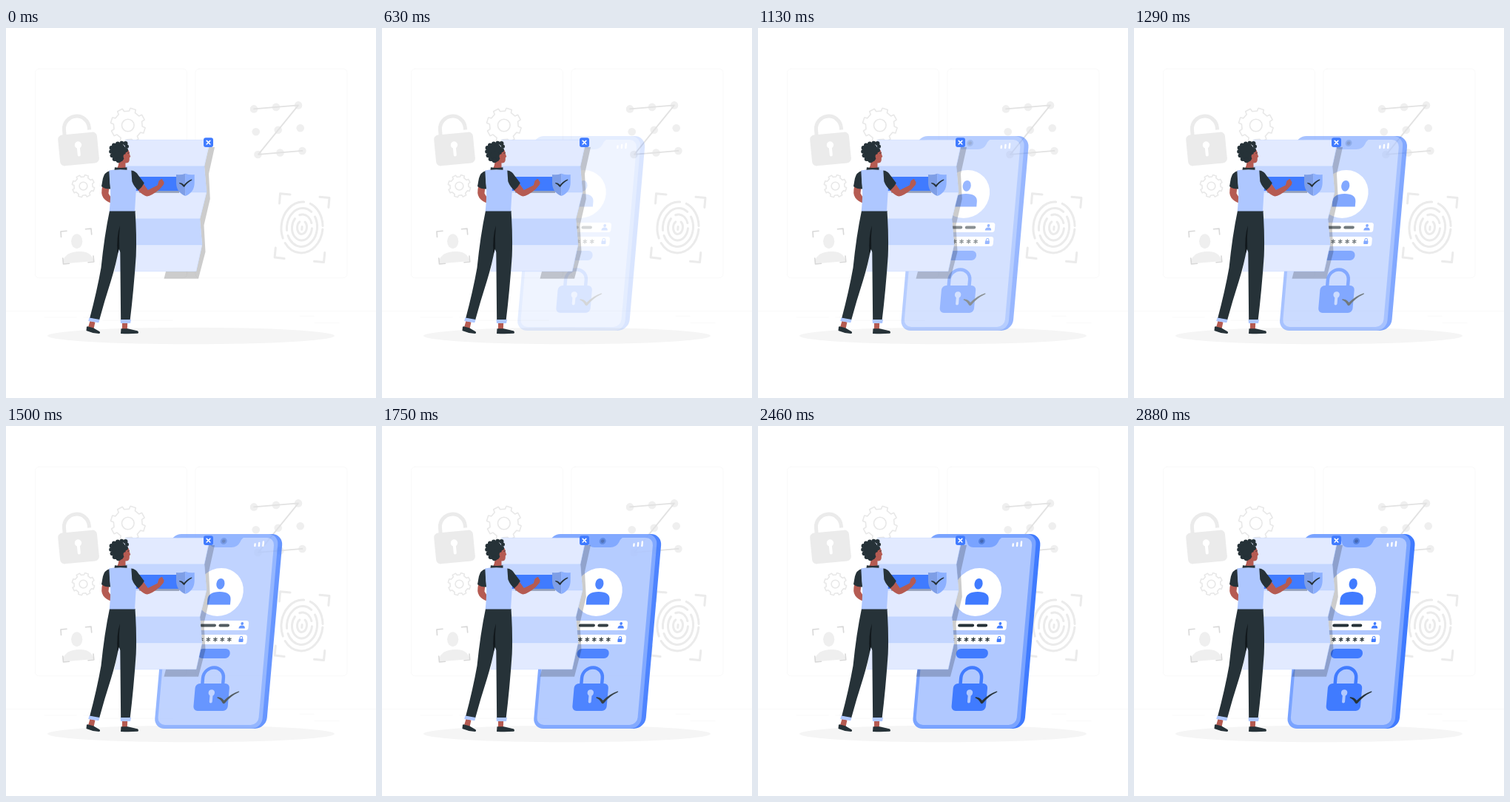
These frames come from a looping animation (500x500 px, 2.93 s). An HTML page:

```html
<!DOCTYPE html>
<html lang="en">
<head>
<meta charset="utf-8">
<title>Secure sign-in</title>
<style>
  html, body { margin: 0; width: 100%; height: 100%; overflow: hidden; background: #fff; }
  svg { display: block; width: 100vw; height: 100vh; }
  .line { fill: none; stroke-linecap: round; stroke-linejoin: round; }
  .dark { fill: #263238; }
  .blue { fill: #407bff; }
  .skin { fill: #b55b52; }
  .pale { fill: #aec7ff; }
  .white { fill: #fff; }
</style>
</head>
<body>
<svg viewBox="0 0 500 500">
  <!-- Room -->
  <g class="line" stroke="#ebebeb" stroke-width=".3">
    <rect x="39.5" y="55.2" width="205" height="282.4" rx="5"/>
    <rect x="256" y="55.2" width="205" height="282.4" rx="5"/>
    <path d="M0 382.5H500M417 398.6h33M397 389.3h19M52 391h43M105 391h6M131 395.2h94"/>
  </g>
  <ellipse cx="250" cy="416" rx="194" ry="11.3" fill="#f5f5f5"/>

  <!-- Grey padlock, shackle open on the right -->
  <g transform="rotate(-5.5 98 163)">
    <path fill="none" stroke="#ebebeb" stroke-width="5" d="M81 145v-9a17 17 0 0 1 34 0v3"/>
    <rect x="71.5" y="142.5" width="53" height="42" rx="6" fill="#ebebeb"/>
    <circle class="white" cx="98" cy="158" r="4.7"/>
    <path class="line" stroke="#fff" stroke-width="4" d="M98 160v11.5"/>
  </g>

  <g id="gears" class="line" stroke="#e8e8e8" stroke-width="1.6"></g>

  <!-- Face scan -->
  <g fill="#efefef">
    <ellipse cx="95.7" cy="288.3" rx="7.6" ry="10"/>
    <path d="M77 318.5q0-14 18-16.2q20-2.3 23.5 12.7z"/>
  </g>
  <path class="line" stroke="#d8d8d8" stroke-width="1.6"
    d="M74.5 282.5L74 275l8-.7M107.5 271.7l7.5-.6l.7 7.9M118 308l.8 8l-7.8.7M76.8 311l.7 8l8-.7"/>

  <!-- Unlock pattern -->
  <g transform="translate(0 .4)">
    <g id="dots" fill="#efefef"></g>
    <path class="line" stroke="#e2e2e2" stroke-width="1.8" d="M335 109l60-5l-54 66.5l59.5-5"/>
  </g>

  <!-- Fingerprint -->
  <g class="line" stroke="#ebebeb" stroke-width="3">
    <path d="M369.5 237l1-13.2l13.5 1.2M424 228.3l13 1.2l-1.2 13M364.3 297l-1.2 13l13 1.5M416.5 315.3l13 1.2l1.3-13"/>
    <g id="print" transform="translate(400 269.5) rotate(5)"></g>
  </g>

  <!-- Phone -->
  <g id="phone">
    <g transform="translate(0 409) skewX(-5) translate(0 -409)">
      <rect class="blue" x="213" y="146" width="144.7" height="263" rx="15"/>
      <rect x="206.3" y="146" width="145.4" height="263" rx="14" fill="#79a3ff"/>
      <rect x="210.5" y="151" width="136" height="253" rx="10" fill="#b0c8ff"/>
      <path fill="#79a3ff" d="M251 150.5q6 1 7.5 6q2 7.5 9 7.5h22q8 0 11-7q2-6 6-6.5z"/>
      <circle cx="278.3" cy="155.6" r="4.5" fill="#5583e2"/>
      <circle cx="278.3" cy="155.6" r="2.4" fill="#4468b4"/>
      <path class="line" stroke="#fff" stroke-width="2.4" d="M321 162v-2.5M326.5 162v-4M332 162v-5.5"/>

      <circle class="white" cx="278.4" cy="224.5" r="32.4"/>
      <g class="blue">
        <ellipse cx="279" cy="213.3" rx="5.6" ry="7.4"/>
        <path d="M263.3 241.6v-7q0-10.6 15.5-10.6t15.7 10.6v7z"/>
      </g>

      <rect class="white" x="228" y="263" width="93.8" height="13" rx="3.5"/>
      <path class="line" stroke="#263238" stroke-width="4" d="M258 269.5h18M283.5 269.5h10.5"/>
      <g class="blue">
        <circle cx="313" cy="267" r="1.9"/>
        <path d="M308.8 273.5q0-4 4.2-4t4.2 4z"/>
      </g>
      <rect class="white" x="228" y="282" width="93.4" height="13" rx="3.5"/>
      <path id="stars" class="line" stroke="#263238" stroke-width="1.3"/>
      <rect class="blue" x="310.3" y="287.5" width="6" height="4.5" rx=".8"/>
      <path class="line" stroke="#407bff" stroke-width="1" d="M311.5 288v-1.8a1.8 1.8 0 0 1 3.6 0v1.8"/>
      <rect class="blue" x="257" y="301" width="43" height="13" rx="6"/>

      <path class="line" stroke="#407bff" stroke-width="4.5" d="M266.3 350v-9.7a13.9 13.9 0 0 1 27.8 0v9.7"/>
      <rect class="blue" x="257" y="348" width="46.3" height="37" rx="6"/>
      <circle cx="279.8" cy="360.5" r="4.2" fill="#b0c8ff"/>
      <path class="line" stroke="#b0c8ff" stroke-width="4" d="M279.8 362v10.5"/>
      <path class="dark" d="M288.5 366.2q5.5.3 9 4.8q9-9.5 18.5-12.5q2 0 .5 1.2q-10.5 5-17.5 14.800q-1.500 1.500-3 0q-3-5-7.500-6.700q-1.500-1 0-1.600z"/>
    </g>
  </g>

  <!-- Folded sheet -->
  <path opacity=".2" d="M274 161h8l-8 36l1.800 34l-8.300 35.500l2 36l-9.500 36.200H213.500l2.500-9.700h41l8-36l-3-35l9-36l-3-35z"/>
  <g id="sheet" stroke="#b9cfff" stroke-width=".4"></g>
  <path opacity=".25" d="M180 219h54v4h-54z"/>
  <path class="blue" d="M172 201h66v19h-66z"/>
  <path fill="#7e9ee6" d="M242.500 196.800q-6 2.200-12.500 1.200v11q0 13 12.500 18z"/>
  <path fill="#8cb0ff" d="M242.500 196.800q6 2.200 12.200 1.200v11q0 13-12.200 18z"/>
  <path class="dark" d="M234.500 209q3.500 0 6 3q5-6 10.500-7.500q1 .3 0 1.200q-6 3-9.500 8.500q-1 1.300-2 0q-2-3-5-4q-1-.8 0-1.200z"/>
  <rect class="blue" x="267" y="148.300" width="13" height="12.700" rx="3"/>
  <path class="line" stroke="#fff" stroke-width="1.600" d="M271.200 152.400l4.600 4.600m0-4.600l-4.600 4.600"/>

  <!-- Man -->
  <g>
    <path class="skin" d="M113.500 396l7 1.500l-2 9l-7.500-2zM157 398h7.200l-.4 10h-6.800z"/>
    <path class="dark" d="M109 403.800q1-1 3 0l6 1.500l8.500 5q1.500 2.300-1 2.700q-9-.5-17-4zM155.500 406.200l9 .1l13 3q2.500 1.500.8 3.500q-11 .8-23.300.2z"/>
    <path class="dark" d="M140 247H174.500Q176.800 281 175.700 308Q172.500 355 167.500 396H155.200L154.300 303L152.500 298Q149 318 142 341Q133 369 126 395L113.200 392Q123 355 128.500 324Q133 280 140 247z"/>
    <path fill="#12191d" d="M154 267q-5 14-3.500 39l2.600-8q-.8-16 .9-31z"/>
    <path class="pale" d="M112.500 391.500l14 2.500l-1.300 4.200l-14-2.300zM154.500 394h14.500l-1 5h-13z"/>

    <path class="skin" d="M130.500 213q-3 11 1 16.500q4 5 10 7v-8l-3-5l1-9z"/>
    <path class="dark" d="M140 193q-7 2-9 10l-2 11q5 4 12 3.500z"/>
    <path class="skin" d="M178 219q8 8 12.500 8.500q6-.5 17-9.500l3.500-4q3-3 2.500-5.500q-.5-2-1.500-2q.2-2.500-2-2.500l-3.500 2.500l-1.700 6l-13 6.500l-6-8.500z"/>
    <path class="pale" d="M139.300 192.500q12-2.700 30.500 0l6.200 23l-2 32h-34.300q2.600-26 .6-38z"/>
    <path class="dark" d="M169.300 192.500q6 .5 9.500 6.500l8 10.500q-3 6-8 9.800q-6-5-8.500-12z"/>
    <path class="skin" d="M152.500 176l9 2v11q-6 2.500-11 0q2.500-5 2-13z"/>
    <path class="dark" d="M147 188.300q8 1.500 16.500 0v3.400q-9-1-17 0z"/>
    <path class="skin" d="M157 165h8.500q1.500 3 1.500 5.500l1.300 3.500l-1.400 1l-.2 4q-.7 3.500-4.700 3.500q-4-1-6-5z"/>
    <g id="hair" class="dark"></g>
    <ellipse class="skin" cx="160.800" cy="173.500" rx="2.200" ry="3"/>
    <path class="line" stroke="#263238" stroke-width=".8" d="M164.800 169.300l1.500-.6"/>
  </g>
</svg>
<script>
const $ = id => document.getElementById(id);
const fill = (id, list, draw) => { $(id).innerHTML = list.map(draw).join(''); };
const range = n => [...Array(n).keys()];

// Toothed wheel outline with a round hub
function gear([cx, cy, r, hub, turn]) {
  const at = (a, k) => (cx + r * k * Math.cos(a)).toFixed(2) + ' ' + (cy + r * k * Math.sin(a)).toFixed(2);
  const teeth = range(8).map(i => {
    const a = turn + i * Math.PI / 4;
    return [[-.22, .81], [-.16, .98], [.16, .98], [.22, .81]].map(([d, k]) => at(a + d, k)).join('L');
  });
  return `<path d="M${teeth.join('L')}z"/><circle cx="${cx}" cy="${cy}" r="${hub}"/>`;
}
fill('gears', [[164.8, 131.5, 24, 8.3, .3], [104.5, 213.6, 15.6, 5.4, .3]], gear);

fill('dots', range(9), i => {
  const col = i % 3, row = i / 3 | 0;
  return `<circle cx="${335 + 30 * col + 2.7 * row}" cy="${109 - 2.5 * col + 30.8 * row}" r="5.3"/>`;
});

fill('print', [[28, 34.5, '74 7 66 9 36 6'], [20.5, 26, '60 7 54 8'], [13.5, 17.5, '60 8 22 8'], [6.5, 9, '32 8']],
  ([rx, ry, dash]) => `<ellipse rx="${rx}" ry="${ry}" stroke-dasharray="${dash}"/>`);
$('print').innerHTML += '<path d="M0-1v4"/>';

$('stars').setAttribute('d', range(6).map(i =>
  `M${250 + 9.5 * i} 286v5m-2.2-3.8l4.4 2.6m0-2.6l-4.4 2.6`).join(''));

const folds = [[161, 275.5, 151.3], [154, 268, 187], [158, 271, 222], [150, 262, 258], [154, 265, 293], [147, 257, 328.8]];
fill('sheet', range(5), i => {
  const [l, r, y] = folds[i], [l2, r2, y2] = folds[i + 1];
  return `<path fill="${i % 2 ? '#c4d6ff' : '#e2eaff'}" d="M${l} ${y}H${r}L${r2} ${y2}H${l2}z"/>`;
});

fill('hair', [[152, 166, 10.3], [152.5, 174, 7.3], [142.5, 162, 2.9], [146, 158.5, 3], [151, 156.6, 3], [156.3, 155.6, 2.9],
  [161.5, 155.9, 3], [163.4, 160, 2.6], [162, 165, 3], [142, 167, 2.8], [143.5, 172.3, 2.9], [146.7, 177, 3], [152, 179, 3.2]],
  ([x, y, r]) => `<circle cx="${x}" cy="${y}" r="${r}"/>`);

// Cubic Bezier easing, solved for x by bisection
const bez = (t, a, b) => 3 * (1 - t) ** 2 * t * a + 3 * (1 - t) * t * t * b + t ** 3;
function ease(x) {
  let lo = 0, hi = 1;
  for (let i = 0; i < 24; i++) {
    const mid = (lo + hi) / 2;
    if (bez(mid, .36, .5) < x) lo = mid; else hi = mid;
  }
  return bez(lo, -.01, 1.38);
}

const LOOP = 2930, LEAD = 40;
function frame() {
  const p = ease(Math.min(1, (performance.now() % LOOP + LEAD) / LOOP));
  $('phone').setAttribute('transform', `translate(${30 * (p - 1)} 0)`);
  $('phone').setAttribute('opacity', Math.min(1, Math.max(0, p)));
  requestAnimationFrame(frame);
}
frame();
</script>
</body>
</html>
```
